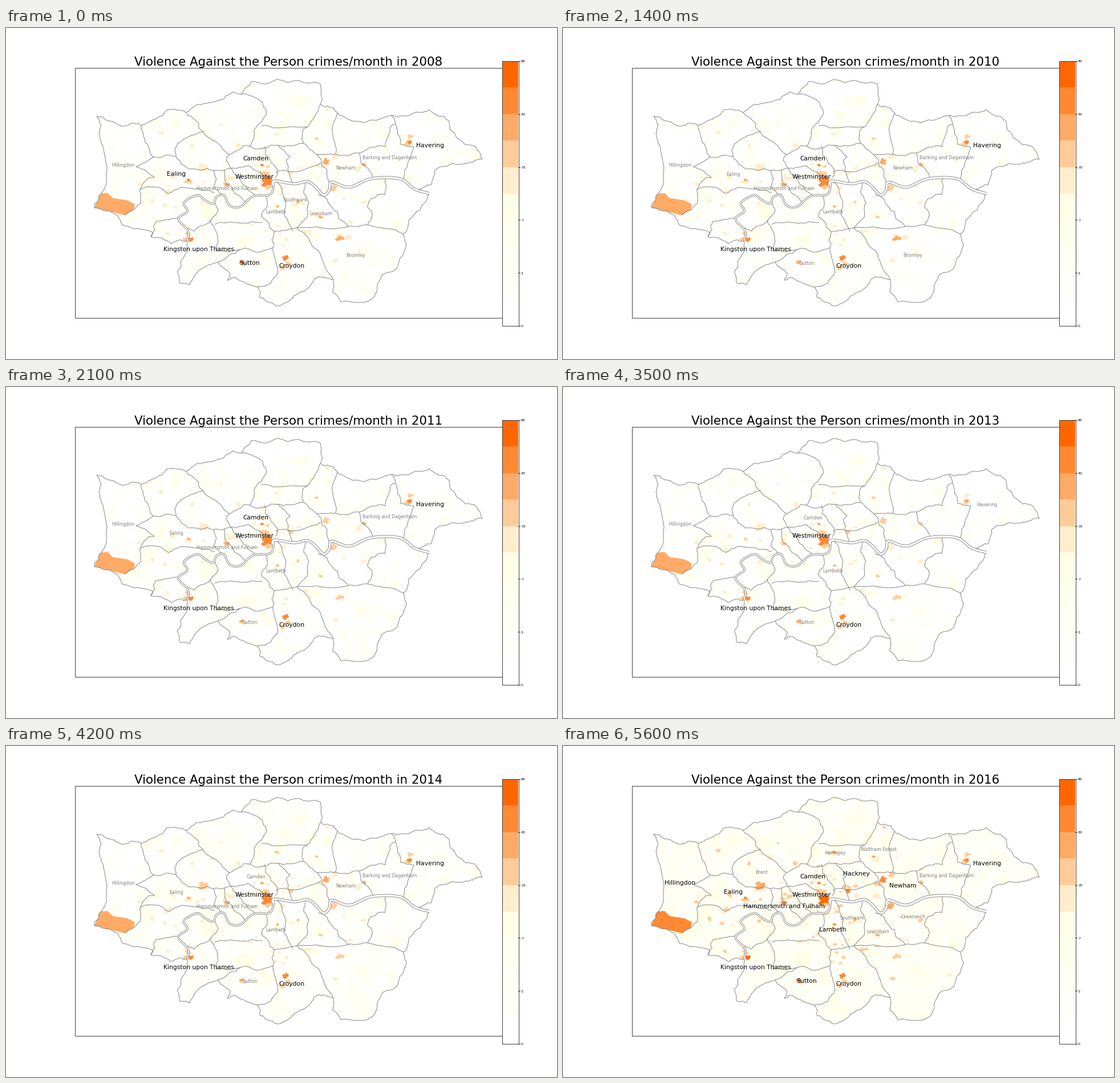
Write a matplotlib script that moves like this. It is 966 by 580 pixels and loops after 6300 ms.

```python
import numpy as np
import matplotlib.pyplot as plt
from matplotlib.animation import FuncAnimation
from matplotlib.colors import LinearSegmentedColormap
from matplotlib.patches import Polygon, Rectangle

W, H = 966, 580
PX = 0.72     # points per pixel at 100 dpi
TEXT = 0.643  # text scale of the whole chart
FIRST, YEARS = 2008, 9
GREY, DARK = "#808080", "#404040"
CENTRE = np.array([465, 270])

plt.rcParams["font.family"] = "DejaVu Sans"
cmap = LinearSegmentedColormap.from_list("heat", ["white", "#ffffe5", "#ff6600"], N=10)
shades = cmap(np.arange(10))
rng = np.random.default_rng(8)

fig = plt.figure(figsize=(9.66, 5.8), dpi=100, facecolor="white")
ax = fig.add_axes([0, 0, 1, 1])
ax.axis("off")


def stroke(pts, color=GREY, px=0.95, z=3):
    ax.plot(pts[:, 0], pts[:, 1], color=color, lw=px * PX, zorder=z,
            solid_joinstyle="round", solid_capstyle="butt")


def border(*xy):
    """Draw a line through the key points, roughened by midpoint displacement."""
    pts = np.array(xy, float).reshape(-1, 2)
    for _ in range(3):
        step = np.diff(pts, axis=0)
        side = np.column_stack([-step[:, 1], step[:, 0]])
        mid = pts[:-1] + step / 2 + side * rng.normal(0, 0.08, (len(step), 1))
        pts = np.insert(pts, np.arange(1, len(pts)), mid, axis=0)
    stroke(pts)
    return pts


def smooth(*xy, steps=6):
    """Catmull-Rom curve through the key points."""
    p = np.array(xy, float).reshape(-1, 2)
    p = np.vstack([2 * p[0] - p[1], p, 2 * p[-1] - p[-2]])
    t = np.linspace(0, 1, steps)[:, None]
    return np.vstack([
        0.5 * (2 * b + (c - a) * t + (2 * a - 5 * b + 4 * c - d) * t**2
               + (3 * b - a - 3 * c + d) * t**3)
        for a, b, c, d in zip(p, p[1:], p[2:], p[3:])])


def river(px, *xy):
    pts = smooth(*xy)
    stroke(pts, GREY, px, 4)
    stroke(pts, "white", px - 1.8, 4.1)


# City outline, clockwise from the north-west corner
outline = np.vstack([
    border(159, 154, 178, 163, 200, 171, 237, 171, 262, 160, 307, 144, 316, 148,
           345, 133, 398, 112, 412, 116),
    border(412, 116, 430, 94, 475, 90, 551, 98, 551, 134, 575, 141, 581, 149,
           601, 160, 655, 160, 676, 153),
    border(676, 153, 705, 154, 742, 143, 775, 162, 778, 177, 806, 205, 822, 207,
           835, 230, 803, 238, 777, 240, 752, 249, 745, 275, 722, 285),
    border(722, 285, 742, 291, 726, 319, 697, 361, 702, 379, 695, 400, 680, 425,
           658, 435, 645, 472, 587, 480, 574, 441),
    border(574, 441, 540, 440, 515, 463, 474, 487, 446, 473, 441, 454, 402, 437,
           388, 442, 393, 430, 372, 410),
    border(372, 410, 343, 422, 322, 450, 304, 446, 318, 373, 290, 378, 254, 366,
           257, 358, 205, 346, 195, 328),
    border(195, 328, 155, 315, 167, 290, 172, 218, 163, 185, 159, 154)])
land = Polygon(outline, fc="none", ec="none")
ax.add_patch(land)

# Borough borders north of the river, west to east
border(237, 171, 243, 197, 258, 226, 228, 243, 246, 250, 260, 262, 235, 283,
       235, 308, 208, 328)
border(258, 226, 298, 225, 296, 214, 330, 187, 346, 182)
border(316, 148, 346, 182, 369, 200, 392, 222, 386, 232, 395, 246, 425, 241, 465, 263)
border(298, 225, 320, 247, 364, 250, 395, 246)
border(235, 283, 285, 290, 330, 282, 366, 288)
border(364, 250, 364, 278, 382, 293)
border(383, 249, 386, 272, 420, 305)
border(395, 246, 413, 270, 447, 293)
border(412, 116, 440, 123, 457, 149, 447, 166, 436, 178, 427, 207, 392, 222)
border(448, 171, 529, 173)
border(551, 134, 529, 173, 521, 202, 465, 205, 427, 207)
border(453, 207, 455, 222, 476, 248, 472, 262)
border(478, 206, 498, 225, 492, 235, 502, 270)
border(474, 254, 500, 252, 552, 236)
border(521, 202, 545, 222, 563, 262, 568, 272)
border(545, 222, 578, 221, 620, 219, 665, 208, 683, 168, 676, 153)
border(581, 149, 573, 190, 578, 221)
border(683, 168, 692, 204, 715, 209, 697, 264)
border(620, 219, 622, 235, 643, 261)

# South of the river
border(254, 366, 262, 340, 303, 333)
border(318, 350, 330, 356, 372, 320, 367, 307)
border(358, 336, 370, 360, 368, 391, 411, 388, 468, 385)
border(366, 344, 400, 341, 449, 341)
border(455, 294, 448, 330, 470, 357, 468, 385, 477, 428, 441, 454)
border(411, 388, 372, 410)
border(470, 357, 510, 350, 600, 348, 634, 345, 697, 361)
border(473, 268, 490, 310, 487, 325, 503, 356)
border(526, 270, 522, 290, 531, 305, 510, 350)
border(547, 292, 572, 315, 600, 348)
border(665, 261, 664, 292, 640, 299, 634, 314, 642, 330, 634, 345)
border(510, 350, 548, 390, 574, 441)

river(3.6, 470, 268, 464, 291, 433, 295, 411, 313, 392, 311, 382, 293, 369, 296,
      363, 308, 348, 301, 335, 293, 312, 306, 318, 321, 302, 335, 319, 355, 318, 373)
river(5, 467, 275, 471, 268, 505, 273, 528, 269, 542, 278, 557, 293, 567, 283,
      571, 270, 602, 279, 640, 264, 690, 264, 716, 282, 742, 290)

# Pale ward mosaic: every pixel block belongs to its nearest seed
X0, X1, Y0, Y1 = 150, 840, 84, 492
CELLS = 900
sites = rng.uniform([X0, Y0], [X1, Y1], (CELLS, 2))
gx, gy = np.meshgrid(np.arange(X0, X1, 2) + 1, np.arange(Y0, Y1, 2) + 1)
best = np.full(gx.shape, np.inf)
cell = np.zeros(gx.shape, int)
for k, (sx, sy) in enumerate(sites):
    dist = (gx - sx) ** 2 + (gy - sy) ** 2
    near = dist < best
    best[near] = dist[near]
    cell[near] = k
base = rng.exponential(0.75, CELLS)
mosaic = ax.imshow(shades[cell * 0], extent=(X0, X1, Y1, Y0), aspect="auto",
                   interpolation="nearest", zorder=1)
mosaic.set_clip_path(land)


def ward_shades(year):
    level = np.interp(year, [0, 5, 8], [0.5, 0.3, 1.5])
    wobble = np.random.default_rng(year).normal(0, 0.2, CELLS)
    return np.clip(base + level + wobble, 0, 4).astype(int)


def course(start, low, end, surge=None):
    """Shade level per year: fall to the 2013 low, rise after, one-off surge."""
    levels = np.interp(np.arange(YEARS), [0, 5, 8], [start, low, end])
    if surge:
        levels[surge - FIRST] += 1
    return levels


def blob(x, y, size):
    """Jagged patch of about the given size, a little wider than tall."""
    n = 13
    ang = (np.arange(n) + rng.uniform(-0.3, 0.3, n)) * 2 * np.pi / n
    r = size / 2 * rng.uniform(0.5, 1.35, n)
    return np.column_stack([x + 1.2 * r * np.cos(ang), y + 0.85 * r * np.sin(ang)])


wards, labels = [], []


def ward(pts, levels, z=2):
    patch = Polygon(pts, ec="none", zorder=z)
    ax.add_patch(patch)
    patch.set_clip_path(land)
    wards.append((patch, np.clip(levels, 0, 9).astype(int)))


def borough(name, label_at, ward_at, size, *trend):
    """A name whose style follows the shade of its hottest ward."""
    levels = course(*trend)
    pts = blob(*ward_at, size) if size else HEATHROW
    ward(pts, levels, 2.2)
    for _ in range(2):
        x, y = ward_at + rng.normal(0, 0.7 * size + 3, 2)
        ward(blob(x, y, 0.8 * size + 2), np.minimum(levels - 2, 6))
    text = ax.text(*label_at, name, ha="center", va="baseline")
    labels.append((text, levels))


# Scattered warm wards, denser towards the centre
for _ in range(75):
    x, y = rng.normal(CENTRE, [120, 65])
    rise = rng.uniform(0, 1.6)
    ward(blob(x, y, rng.uniform(4, 9)), course(4.3 + rise, 4 + rise, 5.2 + rise), 1.5)

HEATHROW = smooth(165, 290, 178, 289, 187, 298, 213, 302, 226, 309, 224, 318, 208, 328,
                  155, 315, 165, 290, steps=2)
borough("Westminster", (435.5, 264.5), (458, 270), 18, 8.8, 8.5, 9.3)
borough("Kingston upon Thames", (338, 391), (324, 370), 9, 8.7, 8.4, 9.2)
borough("Croydon", (501, 420), (490, 403), 10, 8.5, 8.4, 8.9)
borough("Camden", (438, 232.5), (449, 240), 5, 8.6, 7.6, 8.6)
borough("Havering", (743, 209), (708, 200), 8, 8.6, 7.7, 8.7)
borough("Hillingdon", (205, 243), (178, 250), 0, 7.6, 7.2, 8.1, 2009)
borough("Ealing", (298.5, 259), (320, 267), 6, 8.1, 6.5, 8.1)
borough("Hammersmith and Fulham", (388, 284.5), (387, 274), 8, 7.6, 6.8, 8.7)
borough("Lambeth", (473, 325), (477, 313), 5, 7.5, 7.5, 8.3)
borough("Sutton", (427.5, 415), (413, 411), 7, 8.1, 7.2, 8.1)
borough("Newham", (595.5, 248), (561, 233), 12, 7.6, 6.4, 8.9)
borough("Barking and Dagenham", (673, 230), (628, 239), 7, 7.4, 6.9, 7.4)
borough("Bromley", (613, 401), (585, 369), 12, 7.6, 6.2, 6.9, 2015)
borough("Waltham Forest", (553, 184.5), (544, 194), 6, 6.9, 6.3, 7.6, 2009)
borough("Greenwich", (613.5, 302.5), (573, 280), 14, 6.8, 5.8, 7.1, 2009)
borough("Lewisham", (552, 328), (551, 331), 7, 7.1, 6.2, 7.7)
borough("Southwark", (507, 304.5), (512, 305), 6, 7.1, 5.8, 7.1)
borough("Hounslow", (271, 313), (279, 311), 7, 5.4, 5.4, 6.8, 2015)
borough("Hackney", (514, 227), (500, 254), 8, 5.5, 6.4, 8.1)
borough("Kensington and Chelsea", (411, 278), (389, 260), 6, 5.6, 5.4, 6.8, 2015)
borough("Haringey", (477, 190), (475, 186), 7, 5.5, 5.5, 7.1)
borough("Brent", (348, 223.5), (346, 245), 15, 5.2, 5.4, 7.2)

# Title, map frame and colour bar
title = ax.text(495, 66, "", ha="center", va="baseline", fontsize=24 * TEXT, zorder=6)
ax.add_patch(Rectangle((120.5, 69.5), 749, 438, fc="none", ec=DARK, lw=PX, zorder=5))
BX, BW, TOP, BOTTOM = 870, 28, 58, 522
step = (BOTTOM - TOP) / len(shades)
for i, color in enumerate(shades):
    ax.add_patch(Rectangle((BX, BOTTOM - (i + 1) * step), BW, step, fc=color,
                           ec="none", zorder=7))
ax.add_patch(Rectangle((BX - 0.5, TOP - 0.5), BW + 1, BOTTOM - TOP, fc="none",
                       ec=DARK, lw=PX, zorder=8))
for i, value in enumerate([0, 3, 7, 15, 30, 80]):
    y = BOTTOM - 2 * i * step
    ax.plot([BX + BW, BX + BW + 3], [y, y], color="black", lw=0.8 * PX, zorder=8)
    ax.text(903, y + 2.4, str(value), fontsize=7 * TEXT, va="baseline", zorder=8)

ax.set_xlim(0, W)
ax.set_ylim(H, 0)


def update(year):
    title.set_text(f"Violence Against the Person crimes/month in {FIRST + year}")
    mosaic.set_data(shades[ward_shades(year)[cell]])
    for patch, levels in wards:
        patch.set_facecolor(shades[levels[year]])
        patch.set_visible(levels[year] >= 4)
    for text, levels in labels:
        bold = levels[year] >= 8
        text.set_visible(levels[year] >= 7)
        text.set_fontsize((12 if bold else 9) * TEXT)
        text.set_color("black" if bold else GREY)
        text.set_zorder(6.5 if bold else 6)


anim = FuncAnimation(fig, update, frames=YEARS, interval=700, repeat=True,
                     repeat_delay=0, init_func=lambda: update(0))
plt.show()
```
